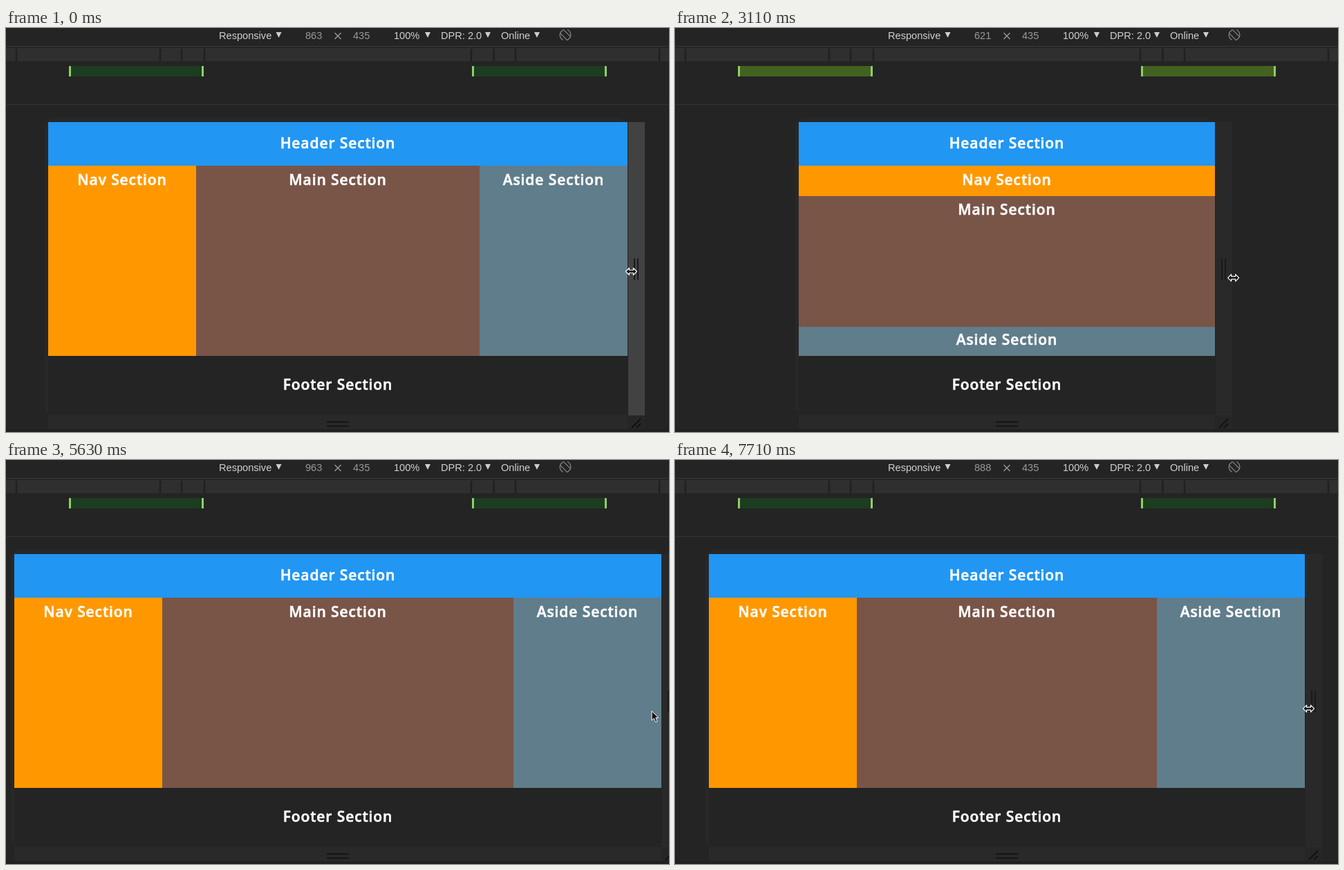
An HTML page that plays this animation: 959 px wide and 584 px high, repeating every 8000 ms.

```html
<!DOCTYPE html>
<html lang="en">
<head>
<meta charset="utf-8">
<title>Responsive layout</title>
<style>
  html, body { margin: 0; width: 100%; height: 100%; overflow: hidden; background: #242424; }
  svg { display: block; width: 959px; height: 584px; }
  .tool { font: 14.6px "Liberation Sans", Arial, sans-serif; fill: #cfcfcf; }
  .dim { fill: #999; }
  .title { font: 600 21px "Open Sans", sans-serif; letter-spacing: .9px; text-anchor: middle;
    fill: #fff; stroke: #fff; stroke-width: .6px; stroke-linejoin: round; }
</style>
</head>
<body>
<svg viewBox="0 0 959 584">
  <path d="M0 26.5H959" stroke="#3b3b3b"/>
  <path d="M0 29H959V48H0Z" fill="#2f2f2f"/>
  <path d="M15 30V48M223 30V48M254 30V48M287 30V48M673 30V48M705.5 30V48M737 30V48M945 30V48" stroke="#202020" stroke-width="2.5"/>
  <path d="M0 110.5H959" stroke="#323232"/>
  <path id="ranges" d="M91 55H286V70H91ZM674 55H869V70H674Z"/>
  <path d="M92.5 55V70M284.5 55V70M675.5 55V70M867.5 55V70" stroke="#8fcf63" stroke-width="3"/>
  <g class="tool">
    <text x="308" y="15.5">Responsive</text>
    <text x="433" y="15.5" class="dim" id="width"></text>
    <text x="502" y="15.5" class="dim">435</text>
    <text x="561" y="15.5">100%</text>
    <text x="629" y="15.5">DPR: 2.0</text>
    <text x="716" y="15.5">Online</text>
    <path d="M390.5 6h8l-4 8zM606 6h8l-4 8zM693 6h8l-4 8zM764 6h8l-4 8z"/>
  </g>
  <path d="M475.5 7l9 9m0-9l-9 9" stroke="#999" stroke-width="1.4"/>
  <g transform="translate(809 10) rotate(-45)" fill="none" stroke="#8a8a8a" stroke-width="1.2">
    <rect x="-3.5" y="-7.5" width="7" height="15" rx="1"/>
    <path d="M-3.5 -7A8 8 0 0 0 -7.5 3M3.5 7A8 8 0 0 0 7.5 -3"/>
  </g>

  <rect id="shadow" y="130" height="430" rx="14" fill="#282828"/>
  <rect id="bottomBar" y="559" height="21" fill="#292929"/>
  <path d="M0 582H959" stroke="#202020" stroke-width="4"/>
  <path d="M464 569.5H496M464 575.5H496" stroke="#141414" stroke-width="2"/>
  <g id="side">
    <rect id="grip" x="1" y="136" width="24" height="424"/>
    <path d="M10 333V364M15 333V364" stroke="#191919" stroke-width="2"/>
    <rect x="1" y="560" width="24" height="20" fill="#262626"/>
    <path d="M6 578l13-13M13 578l6-6" stroke="#101010" stroke-width="1.8"/>
  </g>
  <g id="page"></g>
  <path id="resize" d="M-8 0L-3-5V-2H3V-5L8 0L3 5V2H-3V5Z" fill="#111" stroke="#fff" stroke-width="1.2" stroke-linejoin="round"/>
  <path id="arrow" d="M0 0V13.5L3.2 10.7L5.6 16L8 15L5.7 9.8H9.6Z" fill="#111" stroke="#fff" stroke-linejoin="round"/>
</svg>
<script>
const $ = id => document.getElementById(id);
const MID = 480, HALF = .486, LOOP = 8000, STEP = 148, BREAK = 768, COLUMN = 214;

// Turning points of the drag: [step, viewport width]
const turns = [
  [2, 863], [7, 756], [8, 756], [13, 590], [15, 590], [18, 510], [21, 621], [22, 664], [23, 664],
  [28, 906], [31, 952], [35, 983], [36, 983], [38, 963], [41, 845], [42, 845],
  [44, 716], [46, 684], [48, 735], [49, 735], [52, 888]
];

function widthAt(step) {
  const i = turns.findIndex(turn => turn[0] > step);
  if (i < 1) return turns.at(i)[1];
  const [a, from] = turns[i - 1], [b, to] = turns[i];
  return Math.round(from + (to - from) * (step - a) / (b - a));
}

function set(node, attrs) {
  for (const key in attrs) node.setAttribute(key, attrs[key]);
  return node;
}
function make(tag, attrs) {
  const node = document.createElementNS("http://www.w3.org/2000/svg", tag);
  $("page").append(node);
  return set(node, attrs);
}
function section(name, fill) {
  const box = make("rect", { fill }), label = make("text", { class: "title" });
  label.textContent = name + " Section";
  return (x, y, width, height, baseline) => {
    set(box, { x, y, width, height });
    set(label, { x: x + width / 2, y: baseline });
  };
}
const header = section("Header", "#2196f3");
const nav = section("Nav", "#ff9800");
const main = section("Main", "#795548");
const aside = section("Aside", "#607d8b");
const footer = section("Footer", "#242424");

function draw(step) {
  const width = widthAt(step), wide = width >= BREAK;
  const x = Math.ceil(MID - width * HALF), right = Math.floor(MID + width * HALF), w = right - x;
  header(x, 136, w, 63, 173.5);
  footer(x, 474, w, 85, 522.5);
  if (wide) {
    nav(x, 199, COLUMN, 275, 226.5);
    main(x + COLUMN, 199, w - 2 * COLUMN, 275, 226.5);
    aside(right - COLUMN, 199, COLUMN, 275, 226.5);
  } else {
    nav(x, 199, w, 44, 226.5);
    main(x, 243, w, 189, 269.5);
    aside(x, 432, w, 42, 458);
  }
  $("width").textContent = width;
  set($("ranges"), { fill: wide ? "#1c3d1f" : "#436220" });
  set($("shadow"), { x: x - 5, width: w + 5 });
  set($("bottomBar"), { x, width: w });
  set($("side"), { transform: `translate(${right} 0)` });
  set($("grip"), { fill: step <= turns[0][0] ? "#424242" : "#292929" });

  // The pointer is one step ahead of the edge it drags.
  const px = MID + widthAt(step + 1) * HALF + 5;
  const py = 352 + 11 * Math.sin(Math.PI * step / 68);
  const inside = px < right - 10;
  for (const [id, on] of [["arrow", inside], ["resize", !inside]])
    set($(id), { transform: `translate(${px} ${py})`, visibility: on ? "visible" : "hidden" });
}

function tick() {
  draw(Math.floor(performance.now() % LOOP / STEP + .05));
  requestAnimationFrame(tick);
}
tick();
</script>
</body>
</html>
```
